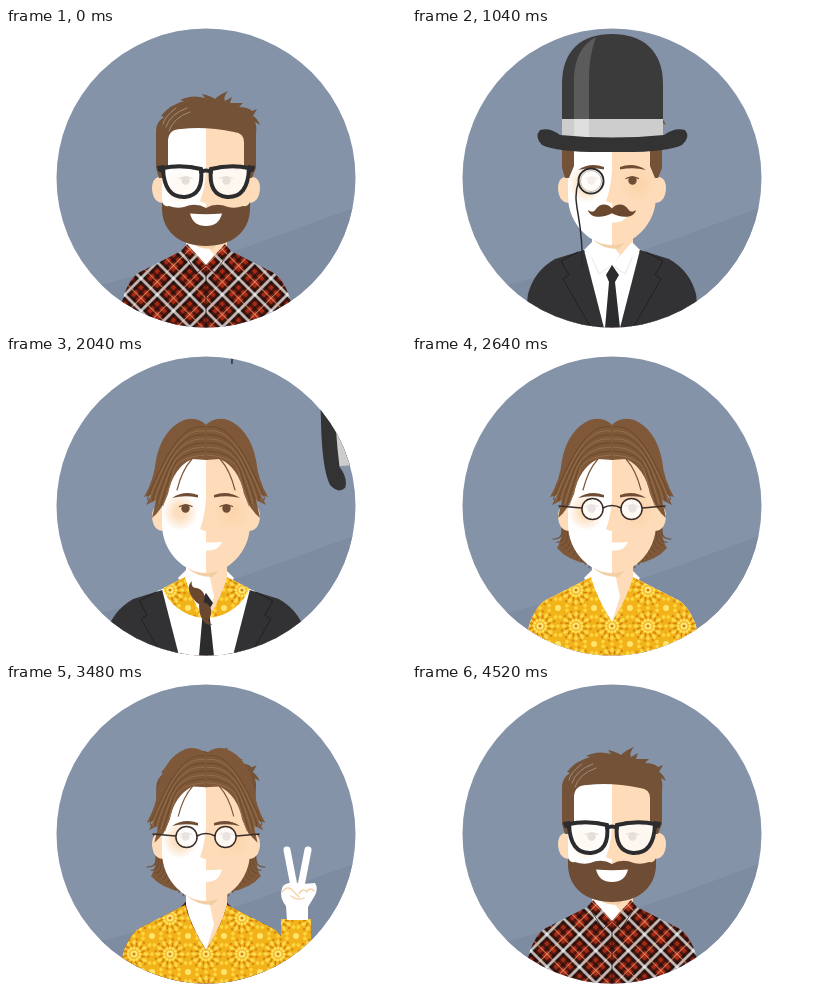
Write an HTML page that moves like this. It is 400 by 300 pixels and loops after 4560 ms.

```html
<!DOCTYPE html>
<html>
<head>
<meta charset="utf-8">
<style>
html, body { margin: 0; width: 100%; height: 100%; overflow: hidden; background: #fff }
svg { display: block; width: 100vw; height: 100vh }
</style>
</head>
<body>
<svg id="stage" viewBox="0 0 400 300"></svg>
<script>
const LOOP = 4560;
const stage = document.getElementById('stage');
const mirror = s => s + `<g transform="translate(400) scale(-1 1)">${s}</g>`;
const path = (d, fill) => `<path d="${d}" fill="${fill}"/>`;
const line = (d, color, w) => `<path d="${d}" fill="none" stroke="${color}" stroke-width="${w}" stroke-linecap="round" stroke-linejoin="round"/>`;
const part = (id, s) => `<g id="${id}">${s}</g>`;
const repeat = (n, f) => Array.from({ length: n }, (_, i) => f(i)).join('');

const SKIN = '#fedcba', SHADE = '#f4cfa5', BROWN = '#735238', HIPPIE = '#7e5838', DARK = '#2c2c2f';

// Shoulders with a rounded V-neck reaching down to y = v
function torso(v, fill) {
  const mid = (221 + v) / 2 - 3;
  return path(`M180 205H220V221Q216 ${mid} 200 ${v}Q184 ${mid} 180 221Z`, '#fff') +
    path(`M200 205H221V221Q216 ${mid} 200 ${v}L208 ${mid}L204 222Z`, SKIN) +
    path('M180 200V211Q190 221 207 221L220 206V200Z', SHADE) +
    path(`M110 300L117 270Q124 247 138 242L179 221Q184 ${mid} 200 ${v}Q216 ${mid} 221 221L262 242Q276 247 284 270L290 300Z`, fill);
}

const bothWays = s => s + `<g transform="rotate(90 11.5 11.5)">${s}</g>`;
const plaid = `<pattern id="plaid" width="23" height="23" patternUnits="userSpaceOnUse" patternTransform="translate(200 244) rotate(45)">
  <rect width="23" height="23" fill="#a82813"/>
  ${bothWays('<rect width="9" height="23" fill="#160e0d" opacity=".7"/><rect x="13" width="3" height="23" fill="#160e0d" opacity=".6"/>')}
  ${bothWays('<rect x="3.2" width="2.6" height="23" fill="#fff" opacity=".75"/><rect x="18" width="1" height="23" fill="#e9a67c" opacity=".7"/>')}
</pattern>`;

const flower = `<pattern id="flower" width="36" height="36" patternUnits="userSpaceOnUse" patternTransform="translate(182 252)">
  <rect width="36" height="36" fill="#f2b21a"/>
  ${repeat(12, i => `<g transform="rotate(${i * 30} 18 18)">
    <circle cx="18" cy="12" r="1.5" fill="#ffe15c"/>
    <ellipse cx="18" cy="6" rx="1.7" ry="2.6" fill="#fbd84c"/>
    <ellipse cx="20.600" cy="9" rx=".8" ry="2.4" fill="#d5820d"/>
    <circle cx="21" cy="3.500" r="1.3" fill="#d98a10"/>
    <circle cx="18" cy="0" r="1.8" fill="#ffd53f"/></g>`)}
  <circle cx="18" cy="18" r="3.600" fill="#ffea80"/><circle cx="18" cy="18" r="1.600" fill="#d5820d"/>
  ${repeat(4, i => `<circle cx="${i % 2 * 36}" cy="${(i >> 1) * 36}" r="3" fill="#ffe46a"/>`)}
</pattern>`;

const blush = `<radialGradient id="blush"><stop offset=".3" stop-color="#fbd3a8" stop-opacity=".75"/>
  <stop offset="1" stop-color="#fbd3a8" stop-opacity="0"/></radialGradient>`;

const zigzag = 'M90 -200H310V0' + repeat(22, i => `L${305 - i * 10} ${i % 2 ? 0 : -5}`) + 'H90Z';

const jacket = path('M112 300L116 266Q122 243 143 231L172 222L192 300V330H112Z', '#323234') +
  line('M166 224L149 233L157 247L151 251L179 300', '#202022', 1);

const quiff = path(`M150 140V103Q150 94 158 89L155 88Q163 77 178 73L174 72Q186 66 199 70L196 66Q205 68 209 71Q214 66 222 63
  Q217 69 219 73L226 69L224 75Q231 75 237 75L233 79Q242 79 246 83L251 81L247 88Q251 90 254 97L249 94Q251 99 250 106V140
  L246 150H243L238 138V114Q238 105 228 104Q200 98 175 101Q163 101 162 112V138L157 150H153Z`, BROWN) +
  line('M160 99Q164 86 181 80M163 103Q167 90 184 84M157 96Q158 89 170 80', '#a08b78', 1);

const lock = path(`M201 70Q192 60 178 64C164 70 154 83 150 104Q148 124 138 141L145 139L140 149L150 144L146 162
  Q156 154 162 138Q167 112 186 103L201 104Z`, HIPPIE) +
  repeat(8, i => line(`M199 ${71 + i * 4}Q${178 - i} ${66 + i * 5} ${157 + i * 1.5} ${108 + i}T${143 + i * 2} ${143 + i}`, i % 2 ? '#9c744e' : '#684629', .8)) +
  line('M186 103Q176 114 171 134', HIPPIE, 1.2);

const strands = path('M147 150C151 176 150 184 145 192Q155 204 176 208L182 200L165 150Z', HIPPIE) +
  repeat(10, i => line(`M${150 + i * 2} 165Q${153 + i * 3} ${184 + i * 2} ${141 + i * 4} ${183 + i * 3.2}`, '#6d4a30', 1.1));

const glasses =
  mirror(`<path d="M157 140Q175 136 195 141Q198 167 179 169Q158 170 157 140Z" fill="#fff" fill-opacity=".82" stroke="${DARK}" stroke-width="4"/>` +
    path('M151 138L158 137V146L152 143Z', DARK)) + line('M195 144Q200 141 205 144', DARK, 4);

const lennons = mirror(`<circle cx="180.500" cy="153" r="10.600" fill="#fff" fill-opacity=".85" stroke="#3a2d28" stroke-width="1.500"/>` +
  line('M169.500 152L147 150', '#3a2d28', 1.5)) + line('M191 152Q200 147 209 152', '#3a2d28', 1.5);

const monocle = line('M167 153C158 175 172 188 170 238', DARK, 1.5) +
  `<circle cx="179" cy="153" r="12.500" fill="#fff" fill-opacity=".9" stroke="${DARK}" stroke-width="2"/>` +
  `<circle cx="179" cy="153" r="10.500" fill="none" stroke="#b9a793" stroke-width=".8"/>`;

const hat = part('crown',
  path('M150 112V56C150 22 170 6 200 6S251 22 251 56V112Z', '#3b3b3c') +
  path('M162 112V50Q163 20 184 9Q177 28 177 50V112Z', '#5b5b5c') +
  path('M150 91H251V112H150Z', '#cdcdcd') + path('M162 91H177V112H162Z', '#dedede')) +
  path('M128 102Q138 99 148 107Q200 112 252 107Q263 99 273 102Q279 109 270 117Q254 125 200 124Q146 125 130 117Q122 109 128 102Z', '#333334');

const face =
  mirror(path('M158 149Q146 147 146 161Q147 175 158 175Z', SKIN)) +
  path('M156 100V168C156 196 178 217 200 217V100Z', '#fff') +
  path('M244 100V168C244 196 222 217 200 217V100Z', SKIN) +
  path('M200 142Q199 160 194 173Q197 175 200 175Z', SKIN) +
  mirror('<ellipse cx="174" cy="156" rx="18" ry="19" fill="url(#blush)"/>' +
    '<circle cx="179.500" cy="152.500" r="4.200" fill="#6e4d34"/>' +
    line('M173.500 150.500Q180 147.500 186 150.500', '#6e4d34', 1.3) +
    path('M166 142Q178 134 192 139V141.500Q178 139 166 142Z', '#6e4d34'));

const beard = path('M156 174Q158 179 163 178Q171 181 178 179Q190 174 200 180Q210 174 222 179Q229 181 237 178Q242 179 244 174V182C243 204 226 218 200 218C174 218 157 204 156 182Z', '#6f4d34');

const stache = mirror(path('M200.500 181C195 174 187 176 184 181Q181 186 176 182C178 191 192 190 200.500 185Z', '#6a482f'));

const hand = path('M275 300V235H305V300Z', 'url(#flower)') +
  path('M281 236L280 222Q272 212 277 202Q283 196 297 200L309 199Q313 205 308 213L302 223V236Z', '#fff') +
  line('M281 166L288 202', '#fff', 7) + line('M302 166L295 202', '#fff', 7) +
  line('M276 208Q282 200 288 208L293 213M293 210Q297 203 301 208M301 207Q305 203 308 207M285 212Q291 217 298 214', SHADE, 1.3);

const clip = (id, s) => `<clipPath id="${id}">${s}</clipPath>`;
const clipped = (id, s) => `<g clip-path="url(#${id})">${s}</g>`;

stage.innerHTML = `<defs>${plaid}${flower}${blush}
  ${clip('disc', '<circle cx="200" cy="150" r="149.500"/>')}
  ${clip('wipe', `<path id="edge" d="${zigzag}"/>`)}
  ${clip('iris', '<circle id="ring" cx="200" cy="215"/>')}</defs>` +
  clipped('disc',
    '<rect width="400" height="300" fill="#8593a9"/>' +
    path('M90 258L235 221L350 179V300H90Z', '#7e8ca1') +
    part('strands', mirror(strands)) +
    torso(238, 'url(#plaid)') +
    mirror(path('M181 216L176 222L191 245L200 237Z', 'url(#plaid)') + line('M176 222L191 245L200 237', '#3a1712', .8)) +
    line('M200 240V300', '#2a1512', 1) +
    part('white', clipped('wipe', torso(238, '#fff') +
      mirror(path('M180 214L172 222L187 246L200 237Z', '#fff') + line('M180 230L187 246L200 237', '#dde0e5', .8)))) +
    clipped('iris', torso(266, 'url(#flower)')) +
    part('tie', path('M200 237L207 247L203 254L208 300H193L197 254L194 247Z', DARK)) +
    part('left', jacket) +
    part('right', `<g transform="translate(400) scale(-1 1)">${jacket}</g>`) +
    part('hand', hand) +
    face +
    part('beard', beard) +
    part('mouth', path('M184 185.500Q200 187 216 185.500Q213 198 200 198Q187 198 184 185.500Z', '#fff')) +
    part('quiff', quiff) + part('locks', mirror(lock)) +
    part('glasses', glasses) + part('lennons', lennons) +
    part('stache', stache) + part('monocle', monocle) + part('hat', hat));

// Eased value at time t from key pairs [time, value]
function at(t, ...keys) {
  let [t0, v0] = keys[0];
  for (const [t1, v1] of keys) {
    if (t < t1) {
      const u = Math.max(0, (t - t0) / (t1 - t0 || 1));
      return v0 + (v1 - v0) * u * u * (3 - 2 * u);
    }
    [t0, v0] = [t1, v1];
  }
  return v0;
}

const $ = id => document.getElementById(id);
const move = (id, x, y) => $(id).setAttribute('transform', `translate(${x} ${y})`);
function pose(id, cx, cy, sx, sy, x = 0, y = 0, turn = 0) {
  $(id).setAttribute('transform', `translate(${cx + x} ${cy + y}) rotate(${turn}) scale(${sx} ${sy}) translate(${-cx} ${-cy})`);
}

function draw(t) {
  const k = (...keys) => at(t, ...keys);

  move('glasses', 0, k([60, 0], [260, -200], [4000, -200], [4260, 0]));
  move('lennons', 0, k([2240, -200], [2480, 0], [3640, 0], [3880, -200]));
  move('monocle', k([1800, 0], [2120, 66]), k([640, -260], [880, 0], [1800, 0], [2120, -272]));

  pose('hat', 200, 112, 1, 1, k([1840, 0], [2200, 216]),
    k([80, -160], [300, 0], [1840, 0], [2200, -90]), k([1840, 0], [2200, 150]));
  pose('crown', 200, 110, 1, k([300, 1], [360, .78], [500, 1.03], [600, 1]));

  const beardSize = k([440, 1], [720, 0], [3780, 0], [4040, 1]);
  pose('beard', 200, 182, beardSize, beardSize);
  pose('mouth', 200, 187, 1, k([560, 1], [760, .7], [3340, .7], [3480, 1]));
  const stacheSize = k([560, 0], [760, 1], [2240, 1], [2300, 0]);
  pose('stache', 200, 182, stacheSize, stacheSize, k([1900, 0], [2210, -9]),
    k([1900, 0], [2210, 150]), k([1900, 0], [2210, 150]));

  const quiffSize = k([1840, 1], [1980, 0], [3280, 0], [3490, 1]);
  pose('quiff', 200, 140, quiffSize, quiffSize);
  const lockSize = k([1840, 0], [2040, 1], [3440, 1], [3760, 0]);
  pose('locks', 200, 90, lockSize, lockSize);
  const strandSize = k([1960, 0], [2500, 1], [3500, 1], [3760, 0]);
  pose('strands', 200, 150, Math.min(1, strandSize * 3), strandSize);

  const open = k([200, 130], [440, 0], [1980, 0], [2260, 130]);
  const drop = open * k([440, .18], [1980, .76]);
  move('left', -open, drop);
  move('right', open, drop);
  move('edge', 0, k([260, 205], [520, 312]));
  $('white').style.display = t < 2900 ? '' : 'none';
  $('ring').setAttribute('r', k([1900, 0], [2264, 140], [3700, 140], [4020, 0]));
  pose('tie', 200, 237, 1, k([480, 0], [700, 1]), 0, k([2040, 0], [2240, 70]));
  move('hand', 0, k([2880, 150], [3160, 0], [3600, 0], [3840, 150]));
}

function frame(now) {
  draw(now % LOOP);
  requestAnimationFrame(frame);
}
draw(0);
requestAnimationFrame(frame);
</script>
</body>
</html>
```
